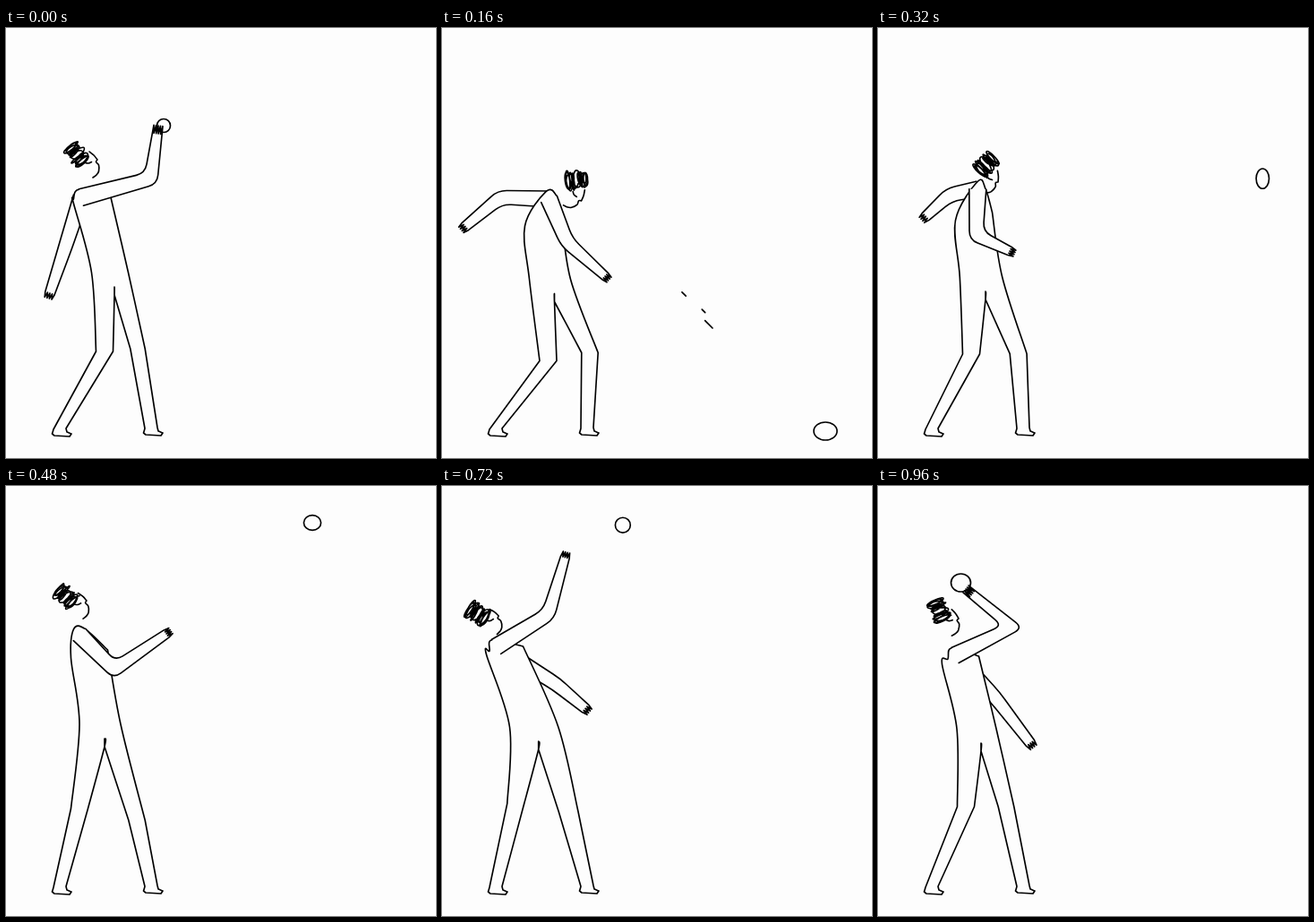
Animation, 480 px wide and 480 px high, one loop 1.04 s. Source, as an HTML page:

```html
<!DOCTYPE html>
<html lang="en">
<head>
<meta charset="utf-8">
<title>Ball throw</title>
<style>
  html, body { margin: 0; width: 100%; height: 100%; overflow: hidden; background: #fdfdfd; }
  svg { display: block; width: 100%; height: 100%; }
  path, ellipse { fill: none; stroke: #000; stroke-width: 1.65; stroke-linecap: round; stroke-linejoin: round; }
  .solid { fill: #fdfdfd; }
</style>
</head>
<body>
<svg viewBox="0 0 480 480">
  <path id="streaks"/>
  <path id="farArm" class="solid"/>
  <path id="body" class="solid"/>
  <path id="head"/>
  <path id="arm" class="solid"/>
  <ellipse id="ball"/>
</svg>
<script>
const STEP = 80, COUNT = 13;

// Joints of the rig in each key pose; the last pair is head tilt and hip width.
const JOINTS = 'shoulder elbow wrist farElbow farWrist chest fork kneeBack kneeFront nose shape'.split(' ');
const POSES = [
  [0, '84,189 162,168 170,109 66,245 49,296 96,192 121,298 110,361 147,358 102,147 0,41'],
  [1, '113,195 175,233 233,263 60,201 22,240 112,212 126,302 122,377 168,366 155,192 60,44'],
  [3, '126,187 104,245 131,291 70,177 30,203 114,222 125,309 115,366 162,359 156,194 65,48'],
  [6, '82,166 121,205 179,165 98,205 100,225 93,188 110,291 82,360 146,373 90,128 -3,46'],
  [8, '58,178 120,145 148,78 124,221 154,252 69,182 109,292 82,354 142,362 57,142 -16,54'],
  [11, '66,182 117,139 116,83 135,222 172,241 72,188 105,298 83,355 139,365 76,151 6,55'],
  [12, '86,189 150,157 98,115 130,235 170,287 92,195 115,296 98,358 143,358 90,148 8,44']
].map(([at, text]) => {
  const pose = { at };
  text.split(' ').forEach((w, i) => pose[JOINTS[i]] = w.split(',').map(Number));
  return pose;
});

// Ball keys: step, x, y, rx, ry.
const FLIGHT = [
  [0, 176, 109, 7.5, 7.5], [1, 341, 368, 17, 7.5], [2, 428, 450, 13, 10],
  [3, 473, 327, 6, 12.5], [6, 342, 41, 9.6, 8.4], [7, 294, 24, 9, 9],
  [8, 244, 26, 9, 9], [11, 117.5, 79, 7.3, 7.3], [12, 92.5, 108, 11, 10]
];

const STREAKS = [[264, 291, 10.5], [287, 311, 8.5], [286, 319, 21.5]]; // x, y, length

const add = (a, b, k = 1) => [a[0] + b[0] * k, a[1] + b[1] * k];
const sub = (a, b) => add(a, b, -1);
const mix = (a, b, k) => a.map((v, i) => v + (b[i] - v) * k);
const unit = a => { const l = Math.hypot(...a) || 1; return [a[0] / l, a[1] / l]; };
const normal = a => [a[1], -a[0]];
const dot = (a, b) => a[0] * b[0] + a[1] * b[1];
const turn = ([x, y], deg) => {
  const c = Math.cos(deg * Math.PI / 180), s = Math.sin(deg * Math.PI / 180);
  return [x * c - y * s, x * s + y * c];
};
const txt = p => p.map(v => v.toFixed(1)).join(' ');
const line = pts => 'M' + pts.map(txt).join('L');
const sharp = p => Object.assign([...p], { sharp: true });

function random(seed) {
  return () => (seed = (seed * 16807) % 2147483647) / 2147483647;
}

// Smooth line through points, broken at sharp ones.
function curve(pts) {
  let d = 'M' + txt(pts[0]);
  for (let i = 0; i < pts.length - 1; i++) {
    const a = pts[i], b = pts[i + 1];
    const before = a.sharp || !i ? a : pts[i - 1];
    const after = b.sharp || !pts[i + 2] ? b : pts[i + 2];
    d += 'C' + [add(a, sub(b, before), 1 / 6), add(b, sub(after, a), -1 / 6), b].map(txt).join(' ');
  }
  return d;
}

// Tapered arm with a rounded elbow and zigzag fingers; open at the root.
function limb(root, mid, end, [w0, w1, w2], reach) {
  const u = unit(sub(mid, root)), v = unit(sub(end, mid));
  const miter = unit(add(normal(u), normal(v)));
  const bend = w1 / Math.max(0.65, dot(miter, normal(u)));
  const side = s => [add(root, normal(u), w0 * s), add(mid, miter, bend * s), add(end, normal(v), w2 * s)];
  const edge = ([a, b, c]) => {
    const p = add(b, unit(sub(a, b)), 10), q = add(b, unit(sub(c, b)), 10);
    return `${txt(a)}L${txt(p)}Q${txt(b)} ${txt(q)}L${txt(c)}`;
  };
  const left = side(1), right = side(-1);
  const fingers = [];
  for (let i = 1; i < 8; i++) {
    fingers.push(add(mix(left[2], right[2], i / 8), v, i % 2 ? reach : 0));
  }
  return 'M' + edge(left) + 'L' + fingers.map(txt).join('L') + 'L' + edge(right.reverse());
}

function foot(x, y) {
  return [[-7, 0], [-8.5, 5], [-6, 7], [11, 8], [13, 5], [8, 3], [7, -1]].map(p => add(p, [x, y]));
}

function torso(p) {
  const u = unit(sub(p.elbow, p.shoulder));
  const [, girth] = p.shape, hip = add(p.fork, [-5, -25]);
  const armpit = sharp(add(p.chest, [20.5, -5]));
  const thigh = girth * 0.2;
  const knee = (k, dx) => sharp(add(k, [dx, 0]));
  return curve([
    armpit, add(p.shoulder, normal(u), 9), add(p.shoulder, u, -9),
    add(p.chest, [-20.5, 4]), add(hip, [-girth / 2, 0]),
    knee(p.kneeBack, -9.5), ...foot(60, 448).map(sharp), knee(p.kneeBack, 9.5),
    p.fork, sharp(add(p.fork, [0, -9])), sharp(p.fork),
    knee(p.kneeFront, -thigh), ...foot(162, 447).map(sharp), knee(p.kneeFront, thigh),
    add(hip, [girth / 2, 0]), armpit
  ]);
}

function head(p, seed) {
  const [tilt] = p.shape, rnd = random(seed * 977 + 5);
  const place = q => add(p.nose, turn(q, tilt));
  const face = [[-9, -9], [-4, -5], sharp([0, 0]), [-1.5, 2.5], [1.5, 6], [1.5, 13], [-1, 17], [-5, 20]];
  const eye = [[-13.5, 3.5], [-10, 4], [-6.5, 2.5]];
  const keep = q => Object.assign(place(q), { sharp: q.sharp });

  // Hair: long loops scribbled back and forth across the crown.
  const crown = place([-23, -6]), hair = [], loops = 11;
  let size = 9;
  for (let i = 0; i <= loops * 8; i++) {
    if (i % 8 === 0) size = 7 + rnd() * 4.5;
    const ang = i * Math.PI / 4;
    const across = 10.5 * Math.sin(i / loops / 8 * Math.PI * 3 - 1.5) + 2.8 * Math.sin(ang);
    hair.push(add(crown, turn([size * Math.cos(ang), across], tilt * 2 - 40)));
  }
  return curve(face.map(keep)) + curve(eye.map(place)) + curve(hair);
}

function span(keys, step, at) {
  let i = keys.length - 1;
  while (at(keys[i]) > step) i--;
  const a = keys[i], b = keys[i + 1] || a;
  return [a, b, a === b ? 0 : (step - at(a)) / (at(b) - at(a))];
}

function ballAt(step) {
  const [a, b, k] = span(FLIGHT, step, key => key[0]);
  const ball = mix(a, b, k).slice(1);
  if (a[0] === 3) ball[1] = b[2] + (a[2] - b[2]) * (1 - k) ** 2; // slows as it rises
  return ball;
}

function streaks(step) {
  const k = (step - 1) / 2;
  if (k < 0 || k > 1) return '';
  return STREAKS.map(([x, y, len]) => {
    const end = add([x, y], [0.71, 0.71], len + 2 * k);
    return line([mix([x, y], end, k * 0.95), end]);
  }).join('');
}

function build(step) {
  const [a, b, k] = span(POSES, step, pose => pose.at);
  const p = {};
  for (const name of JOINTS) p[name] = mix(a[name], b[name], k);
  const ball = ballAt(step);
  const holding = Math.hypot(ball[0] - p.wrist[0], ball[1] - p.wrist[1]) < 15;
  return {
    ball,
    shapes: {
      streaks: streaks(step),
      farArm: limb(p.shoulder, p.farElbow, p.farWrist, [9, 7.5, 5.5], 6),
      body: torso(p),
      head: head(p, step + 1),
      arm: limb(p.shoulder, p.elbow, p.wrist, [9.5, 7.5, 5], holding ? -9 : 6)
    }
  };
}

const steps = Array.from({ length: COUNT }, (_, i) => build(i));
const el = id => document.getElementById(id);
let shown = -1;

function show(i) {
  const { ball: [x, y, rx, ry], shapes } = steps[i];
  for (const id in shapes) el(id).setAttribute('d', shapes[id]);
  el('ball').setAttribute('rx', rx);
  el('ball').setAttribute('ry', ry);
  el('ball').setAttribute('transform', `translate(${x} ${y}) rotate(${i === 1 ? 42 : 0})`);
}

const start = performance.now();
function tick() {
  const i = Math.floor((performance.now() - start) / STEP) % COUNT;
  if (i !== shown) show(shown = i);
  requestAnimationFrame(tick);
}
tick();
</script>
</body>
</html>
```
